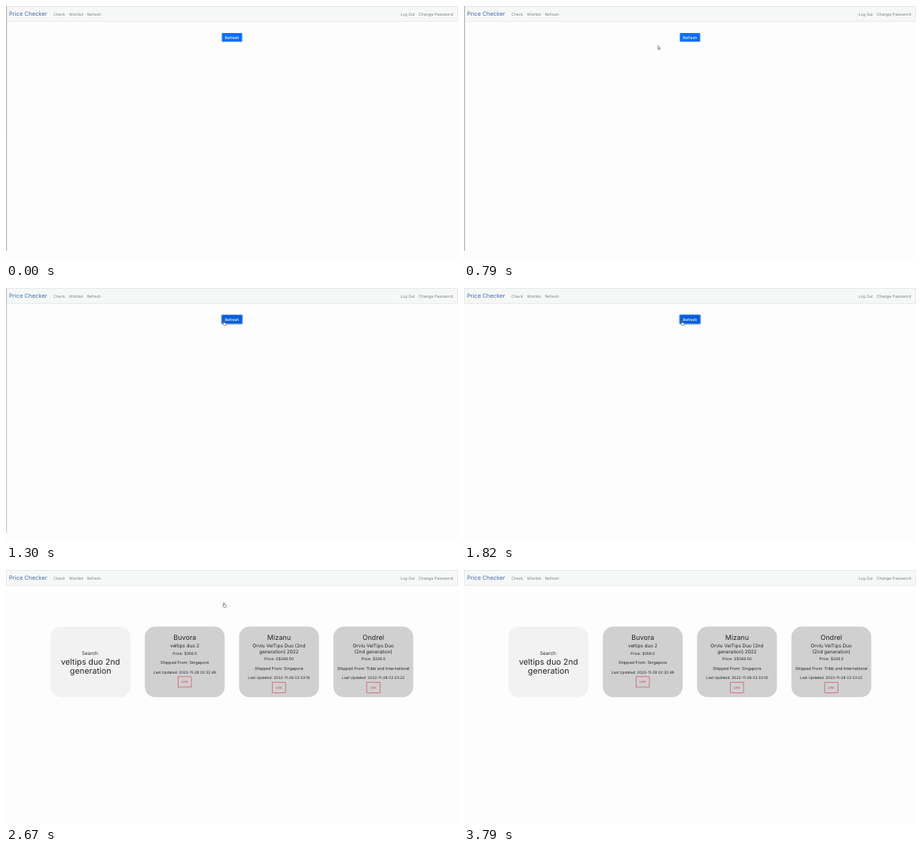
Animation of 600x338 px, one loop 5.51 s. Source, as an HTML page:

```html
<!DOCTYPE html>
<html lang="en">
<head>
<meta charset="utf-8">
<title>Price Checker</title>
<style>
html, body { margin: 0; width: 100%; height: 100%; overflow: hidden; background: #fefdfe; }
svg { display: block; width: 100vw; height: 100vh; }
text { font: 5.1px Inter, "Open Sans", sans-serif; text-rendering: geometricPrecision; fill: #212529; }
.nav text { fill: #7b7e80; }
.nav .brand { font-size: 7.6px; fill: #476bb0; }
.card, .button { text-anchor: middle; }
.card { fill: #d0d0d1; }
.card.search { fill: #f2f2f3; }
.title { font-size: 9.1px; }
.name { font-size: 6.4px; }
.query { font-size: 10.8px; }
.from { font-size: 5.4px; }
.time { font-size: 4.95px; }
.link rect { fill: none; stroke: #dc3545; stroke-width: .6; }
.link text { font-size: 3.7px; fill: #dc3545; }
.button text { fill: #fff; font-weight: 500; }

/* One loop is 5510 ms, so 1% is 55.1 ms */
.button, .results, .cursor, .arrow, .hand { animation: 5510ms step-end infinite; }
.face, .ring, .edge, .path { animation: 5510ms linear infinite; }
.button { animation-name: leave; }
.results { animation-name: arrive; }
.cursor { animation-name: present; }
.arrow { animation-name: point; }
.hand { animation-name: grip; }
.face { animation-name: hover; }
.ring { animation-name: focus; }
.edge { animation-name: retreat; }
.path { animation-name: travel; }

@keyframes leave { 0% { visibility: visible } 35.21%, 100% { visibility: hidden } }
@keyframes arrive { 0% { visibility: hidden } 35.21%, 100% { visibility: visible } }
@keyframes present { 0% { opacity: 0 } .54% { opacity: 1 } 68.78%, 100% { opacity: 0 } }
@keyframes point { 0% { opacity: 1 } 16.33% { opacity: 0 } 65.52%, 100% { opacity: 1 } }
@keyframes grip { 0% { opacity: 0 } 16.33% { opacity: 1 } 65.52%, 100% { opacity: 0 } }
@keyframes hover { 0%, 16.33% { fill: #0d6efd } 18.7%, 100% { fill: #0b5ed7 } }
@keyframes focus { 0%, 21.42% { opacity: 0 } 24.14%, 100% { opacity: 1 } }
@keyframes retreat { 0%, 21.42% { opacity: 1 } 29.22%, 100% { opacity: 0 } }
@keyframes travel {
  0%, .54% { transform: translate(5px, 268px) }
  3.63% { transform: translate(158px, 265px) }
  6.35% { transform: translate(275px, 238px) }
  8.17% { transform: translate(326px, 202px) }
  9.44% { transform: translate(339px, 166px) }
  10.53% { transform: translate(328px, 126px) }
  12.34% { transform: translate(283px, 77px) }
  14.16% { transform: translate(254px, 53px) }
  16.33% { transform: translate(286.5px, 44px) }
  17.42%, 65.16% { transform: translate(289.2px, 43px) }
  65.52% { transform: translate(284px, 49px) }
  66.06% { transform: translate(267px, 52px) }
  67.15% { transform: translate(196px, 37px) }
  68.24%, 100% { transform: translate(111px, 12px) }
}
</style>
</head>
<body>
<svg viewBox="0 0 600 338" preserveAspectRatio="none">
  <defs>
    <linearGradient id="shade">
      <stop offset="0" stop-color="#8f9193"/>
      <stop offset=".4" stop-color="#cfd0d1"/>
      <stop offset="1" stop-color="#fefdfe" stop-opacity="0"/>
    </linearGradient>
    <rect id="panel" x="-53" y="75.3" width="106" height="94" rx="14"/>
    <g id="link" class="link">
      <rect x="-8.7" y="0" width="17.4" height="14"/>
      <text y="8.4">LINK</text>
    </g>
  </defs>

  <g class="nav">
    <rect x=".3" y=".3" width="599.4" height="20.2" fill="#f6f8f8" stroke="#dddfe0" stroke-width=".6"/>
    <text class="brand" x="4" y="13">Price Checker</text>
    <text x="63" y="13.4">Check</text>
    <text x="83.7" y="13.4">Wishlist</text>
    <text x="107.4" y="13.4">Refresh</text>
    <text x="523.7" y="13.4">Log Out</text>
    <text x="593.5" y="13.4" text-anchor="end" style="font-size:5.35px">Change Password</text>
  </g>
  <rect class="edge" width="2.4" height="326" fill="url(#shade)"/>

  <g class="button">
    <rect class="ring" x="285.3" y="34.8" width="29.4" height="13.9" rx="2.4" fill="#86b6fe"/>
    <rect class="face" x="286.5" y="36" width="27" height="11.5" rx="1.3"/>
    <text x="300" y="43.5">Refresh</text>
  </g>

  <g class="results">
    <g class="card search" transform="translate(112.2)">
      <use href="#panel"/>
      <text class="name" y="112.6">Search:</text>
      <text class="query" y="125.8">veltips duo 2nd</text>
      <text class="query" y="137.8">generation</text>
    </g>
    <g class="card" transform="translate(237.3)">
      <use href="#panel"/>
      <text class="title" y="93">Buvora</text>
      <text class="name" y="103.2">veltips duo 2</text>
      <text y="112.7">Price: $358.0</text>
      <text class="from" y="125.3">Shipped From: Singapore</text>
      <text class="time" y="137.7">Last Updated: 2022-11-28 02:32:48</text>
      <use href="#link" y="141.9"/>
    </g>
    <g class="card" transform="translate(362.4)">
      <use href="#panel"/>
      <text class="title" y="93">Mizanu</text>
      <text class="name" y="103.2">Orvlu VelTips Duo (2nd</text>
      <text class="name" y="110.6">generation) 2022</text>
      <text y="120.2">Price: S$349.00</text>
      <text class="from" y="132.8">Shipped From: Singapore</text>
      <text class="time" y="145.2">Last Updated: 2022-11-28 02:33:19</text>
      <use href="#link" y="149.4"/>
    </g>
    <g class="card" transform="translate(487.6)">
      <use href="#panel"/>
      <text class="title" y="93">Ondrel</text>
      <text class="name" y="103.2">Orvlu VelTips Duo</text>
      <text class="name" y="110.6">(2nd generation)</text>
      <text y="120.2">Price: $336.0</text>
      <text class="from" y="132.8">Shipped From: Tribb and International</text>
      <text class="time" y="145.2">Last Updated: 2022-11-28 02:33:22</text>
      <use href="#link" y="149.4"/>
    </g>
  </g>

  <g class="cursor">
    <g class="path" fill="#fff" stroke="#333" stroke-width=".55" stroke-linejoin="round">
      <path class="arrow" d="M.3 .3V5.2L1.5 4.2L2.3 6L3.1 5.6L2.3 3.9H3.8Z"/>
      <path class="hand" d="M-.5 .9Q0 .2 .5 .9V3L2.6 3.4Q3.2 3.6 3.1 4.3L2.7 6.8H-.1L-1.9 4.4Q-1.7 3.6 -.5 4.3Z"/>
    </g>
  </g>
</svg>
</body>
</html>
```
